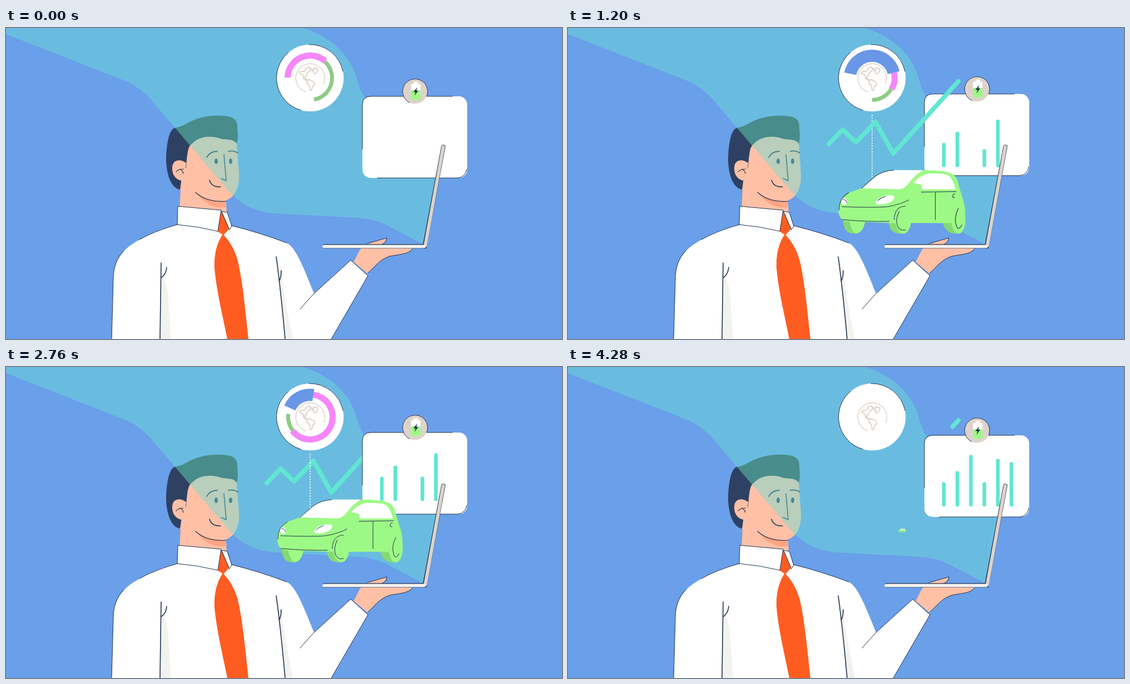
These frames come from a looping animation (1000 px wide and 560 px high, 4320 ms). An HTML page:

```html
<!DOCTYPE html>
<html lang="en">
<head>
<meta charset="utf-8">
<title>Electric car presentation</title>
<style>
  html, body { margin: 0; width: 100%; height: 100%; overflow: hidden; background: #6a9fe9; }
  svg { display: block; width: 100%; height: 100%; }
  .ink { fill: none; stroke: #22324f; stroke-width: 1; stroke-linecap: round; stroke-linejoin: round; }
  .face { stroke-width: 1.5; }
  .skin { fill: #ffc0a6; }
  .white { fill: #fff; }
  .shade { fill: #f2f2ee; }
  .tie { fill: #ff5c22; }
  .hair { fill: #2e4163; }
  .fringe { fill: #2e464d; }
  .green { fill: #9df985; }
  .dark { fill: #84da72; }
  .beige { fill: #ddd3cb; }
  .globe { fill: none; stroke: #ddd0c6; stroke-width: 1.8; stroke-linejoin: round; }
  .teal { fill: none; stroke: #61e6d2; stroke-width: 8; stroke-linecap: round; stroke-linejoin: round; }
  .bar { stroke-width: 6.6; }
  .ring { fill: none; }
</style>
</head>
<body>
<svg viewBox="0 0 1000 560" preserveAspectRatio="none">
  <defs>
    <path id="zigzag" d="M469 209L494 183L518 206L553 169L585 226L702 96"/>
  </defs>
  <rect width="1000" height="560" fill="#6a9fe9"/>

  <g id="man">
    <path class="skin" d="M315 270L312 330L397 335L395 300Z"/>
    <path class="hair" d="M303 180C292 184 288 215 288 238C289 266 297 288 313 291L340 240L334 213Z"/>
    <path class="fringe" d="M303 180L332 214L345 203C360 193 374 196 384 199C398 203 408 198 415 209
      C418 198 417 188 416 181C417 167 411 161 398 159C372 155 345 160 325 172Q315 178 303 180Z"/>
    <path fill="#ffa583" d="M343 297C355 315 372 325 395 323V309Z"/>
    <path class="skin" d="M324 250C326 226 327 213 334 209C345 196 365 193 382 198C396 203 407 198 415 208
      Q417 235 419 262C421 292 407 313 383 313C364 312 350 304 341 296L313 292L316 270Z"/>
    <path class="skin" d="M324 243C313 235 300 237 299 251C298 266 308 276 320 275Z"/>
    <g class="ink face">
      <path stroke-width="1.2" d="M306 259Q310 254 319 254M313 254Q318 257 319 262"/>
      <path stroke-width="1.800" d="M361 233Q367 222 380 222M400 222Q409 220 417 225"/>
      <path d="M392 228L396 275L387 271M366 274Q370 287 386 286"/>
      <path stroke-width="1.2" d="M341 296C355 309 376 314 396 312"/>
    </g>
    <ellipse class="hair" cx="378" cy="240" rx="3" ry="5"/>
    <ellipse class="hair" cx="404" cy="240" rx="3" ry="5"/>

    <path class="white" d="M190 560L193 452C193 425 204 403 232 386Q262 366 308 354L309 321L387 328L398 332L405 356
      Q455 368 505 387C523 396 539 442 554 478L620 418L651 446L585 560Z"/>
    <path class="shade" d="M280 444Q290 455 292 490L297 560H277Z"/>
    <path class="shade" d="M487 414L495 436Q498 475 516 560H502Z"/>
    <path class="tie" d="M386 329L395 331L403 360L391 373L380 366Z"/>
    <path class="tie" d="M390 371C379 387 374 408 375 432C378 470 390 520 398 560H436C430 505 425 450 416 416Q408 389 390 371Z"/>
    <path class="white" d="M309 321L387 328L381 366L308 354ZM388 330L398 332L406 357L402 363Z"/>
    <g class="ink">
      <path d="M308 354L309 321L387 328L381 366Q345 357 308 354M388 330L398 332L406 357L402 363Z"/>
      <path d="M190 560L193 452C193 432 199 414 212 401M240 381Q266 366 308 354M406 356Q455 368 505 387"/>
      <path d="M529 506L553 479L620 418L651 446L585 560"/>
      <path stroke-width="1.600" d="M279 423L277 560M289 431Q288 443 280 449M486 412Q494 470 502 560M495 437Q495 450 491 456"/>
    </g>
    <path class="skin" d="M625 421C635 407 633 394 655 387L684 378Q685 387 668 392L731 397C724 408 703 408 690 411
      C671 417 662 432 650 442Z"/>
    <path class="ink" d="M650 388L685 378Q685 386 674 391M731 398C724 408 703 408 690 411C671 417 662 432 651 441"/>
  </g>

  <path fill="#68ded3" fill-opacity=".46" d="M0 0H535C589 18 618 50 630 88Q637 117 650 130L788 212L753 391
    L681 353Q658 342 620 341L485 334C452 331 427 322 402 295L265 134Q241 104 204 91L0 11Z"/>

  <use id="lineBehind" class="teal" href="#zigzag"/>
  <path id="dots" stroke="#fff" stroke-width="1.3" stroke-dasharray="3 2"/>

  <circle class="white" cx="547" cy="90" r="60.300"/>
  <path class="ink" d="M530 148A60.300 60.300 0 0 1 508 44M545 29.700A60.300 60.300 0 0 1 606 78"/>
  <path id="greenRing" class="ring" stroke="#8fcb85" stroke-width="7"/>
  <path id="pinkRing" class="ring" stroke="#f586fb" stroke-width="11"/>
  <path id="blueRing" class="ring" stroke="#6996e7" stroke-width="22"/>
  <g class="globe">
    <path stroke-width="1.4" d="M539 115A26 26 0 1 1 571 101"/>
    <path d="M528 82L530 78L536 78L540 75L539 72L545 70L548 74L546 78L542 80L540 86L537 89L541 94L546 93L555 98
      L555 102L551 106L550 112L547 113L546 104L541 99L542 95L535 91L534 84Z"/>
    <path d="M546 71L551 75L550 79M553 72L560 73L561 77L556 83L553 81Z"/>
  </g>

  <g id="panel">
    <rect class="white" x="641" y="123" width="188.500" height="147" rx="15"/>
    <path class="ink" d="M641 218V138Q641 123 656 123H803M668 270H812Q826 269 829 254"/>
  </g>
  <g id="bars"></g>
  <use id="lineFront" class="teal" href="#zigzag"/>
  <use id="glint" class="teal" href="#zigzag" style="stroke:#fff;stroke-width:6.500"/>
  <g id="badge">
    <circle class="beige" cx="735.500" cy="114" r="22.500"/>
    <path class="ink" d="M726 134.500A22.500 22.500 0 1 1 757 122"/>
    <path class="white" d="M728.500 101H733V97H741V101H745.500V113H728.500Z"/>
    <rect class="green" x="728.500" y="112" width="17" height="17"/>
    <path fill="#22324f" d="M739.500 107L732.500 115.500H736.500L734.500 122L741.500 113H738Z"/>
  </g>

  <g id="car">
    <path class="dark" d="M495 340C497 361 502 368 516 368Q532 367 535 346Z"/>
    <path class="green" d="M507 344Q511 365 519 368Q532 366 535 346Z"/>
    <path class="dark" d="M577 340C576 360 584 368 598 368L615 340ZM672 344C675 360 683 368 696 368L705 330Z"/>
    <path class="green" d="M488 327C488 312 493 303 506 295L529 287L553 266Q567 256 586 255H640Q682 255 692 263
      Q700 270 702 284Q706 297 708 304Q714 319 713 338L704 349H580L502 346Q488 343 488 327Z"/>
    <ellipse class="green" cx="603" cy="344" rx="14" ry="24"/>
    <ellipse class="green" cx="701" cy="343" rx="12.500" ry="25"/>
    <path class="white" d="M528 287L553 266Q567 256 586 255H638Q623 264 613 278Q606 287 597 289Z"/>
    <path class="white" d="M620 279Q631 264 648 261Q676 260 684 265Q692 273 696 289L637 289L634 281Z"/>
    <path class="green" d="M612 278Q624 276 636 282L635 291L618 291Z"/>
    <path class="white" d="M493 309Q494 304 499 304Q505 309 504 314L497 317Q492 314 493 309Z"/>
    <path class="white" d="M554 314Q556 303 573 300L585 300Q590 303 583 310Q575 316 558 316Z"/>
    <g class="ink">
      <path d="M489 326C489 312 493 303 506 295M529 287L553 266Q567 256 586 255"/>
      <path d="M494 320Q555 322 575 320Q598 316 613 308M495 343Q540 347 578 346M558 309Q563 304 571 302M496 307Q502 308 503 313"/>
      <path d="M587 343C587 328 594 319 607 319M596 328Q588 342 593 355Q598 364 607 361M701 323Q692 340 698 356Q702 363 707 352"/>
      <path d="M635 294L697 293M660 294V343M695 297Q690 297 691 303L694 304"/>
    </g>
  </g>

  <g stroke-linecap="round" fill="none">
    <path stroke="#22324f" stroke-width="7.500" d="M573 393H753L786.500 214"/>
    <path stroke="#ddd3cb" stroke-width="6" d="M754 392L786.500 214"/>
    <path stroke="#f5f3f0" stroke-width="5.700" d="M572 393.300H752"/>
  </g>
</svg>

<script>
const LOOP = 4320, STEP = 40, LINE_LENGTH = 361;
const $ = id => document.getElementById(id);
const clamp = (v, lo = 0, hi = 1) => Math.min(hi, Math.max(lo, v));

// Progress shapes over a time span: linear, eased, overshooting, and up-and-down.
const linear = (t, from, to) => clamp((t - from) / (to - from));
const ramp = (t, from, to) => linear(t, from, to) ** 2 * (3 - 2 * linear(t, from, to));
const swell = (t, from, to) => (1 - Math.cos(2 * Math.PI * linear(t, from, to))) / 2;
const pop = (t, from, to) => {
  const rest = linear(t, from, to) - 1;
  return 1 + 2.7 * rest ** 3 + 1.7 * rest ** 2;
};

const bars = [
  { height: 44, start: 40 }, { height: 64, start: 240 }, { height: 93, start: 3500 },
  { height: 44, start: 960 }, { height: 86, start: 620 }, { height: 80, start: 2990 }
].map((bar, i) => {
  const el = document.createElementNS("http://www.w3.org/2000/svg", "path");
  el.setAttribute("class", "teal bar");
  $("bars").append(el);
  return { ...bar, x: 676 + i * 24.3, el };
});

function trim(el, from, to) {
  const a = clamp(from, 0, LINE_LENGTH), b = clamp(to, 0, LINE_LENGTH);
  el.style.display = b - a > .1 ? "" : "none";
  el.style.strokeDasharray = `${b - a} 9999`;
  el.style.strokeDashoffset = -a;
}

function arc(el, radius, from, to) {
  const point = deg => {
    const a = deg * Math.PI / 180;
    return `${547 + radius * Math.cos(a)} ${90 + radius * Math.sin(a)}`;
  };
  const large = to - from > 180 ? 1 : 0;
  el.setAttribute("d", to - from < .5 ? "" : `M${point(from)}A${radius} ${radius} 0 ${large} 1 ${point(to)}`);
}

function drawPanel(t) {
  const lift = -6.5 * (swell(t, 0, 1700) + swell(t, 1950, 4300));
  for (const id of ["panel", "badge"]) $(id).setAttribute("transform", `translate(0 ${lift})`);

  const base = 243 + 8 * Math.cos(2 * Math.PI * (t - 1680) / 3040);
  for (const { x, height, start, el } of bars) {
    const grown = height * ramp(t, start, start + 360);
    el.setAttribute("d", grown > 1 ? `M${x} ${base}v${-Math.max(.1, grown - 6.6)}` : "");
  }
}

function drawLines(t) {
  trim($("lineFront"), (t - 1455) * .383, (t - 40) * .394);
  trim($("lineBehind"), (t - 3360) * .375, (t - 1940) * .394);
  const glint = (t - 590) * .655;
  trim($("glint"), glint - 29, glint - 3);

  const reach = 130 * ramp(t, 160, 640) * (1 - ramp(t, 3400, 3860));
  $("dots").setAttribute("d", reach > 0 ? `M547 156v${reach}` : "");
}

function drawRings(t) {
  const start = 181 + t * .0083;
  const surge = 100 * ramp(t, 1560, 2300), left = 1 - ramp(t, 2600, 3900);
  const blue = 155 * ramp(t, 100, 1150) - 80 * ramp(t, 1680, 2400) - 73 * ramp(t, 2700, 3800) - 2 * linear(t, 3800, 3900);
  const pink = (131 + 80 * ramp(t, 0, 1600) + surge) * left;
  const green = (259 + surge) * left;
  arc($("blueRing"), 40, start, start + blue);
  arc($("pinkRing"), 40.5, start + blue, start + pink);
  arc($("greenRing"), 39.5, start + pink, start + green);
}

function drawCar(t) {
  const y = 299 + 5 * swell(t, 700, 2100) - 17 * swell(t, 1500, 3340) - 5 * ramp(t, 2400, 3300);
  const scale = (pop(t, 200, 1300) + .09 * swell(t, 3320, 3800)) * (1 - ramp(t, 3700, 4380));
  $("car").style.display = scale > .01 ? "" : "none";
  $("car").setAttribute("transform", `translate(601 ${y}) scale(${scale}) translate(-601 -301.5)`);
}

const began = performance.now();
function frame() {
  const elapsed = (performance.now() - began) % LOOP;
  const t = Math.floor(elapsed / STEP) * STEP;
  for (const draw of [drawPanel, drawLines, drawRings, drawCar]) draw(t);
  requestAnimationFrame(frame);
}
frame();
</script>
</body>
</html>
```
